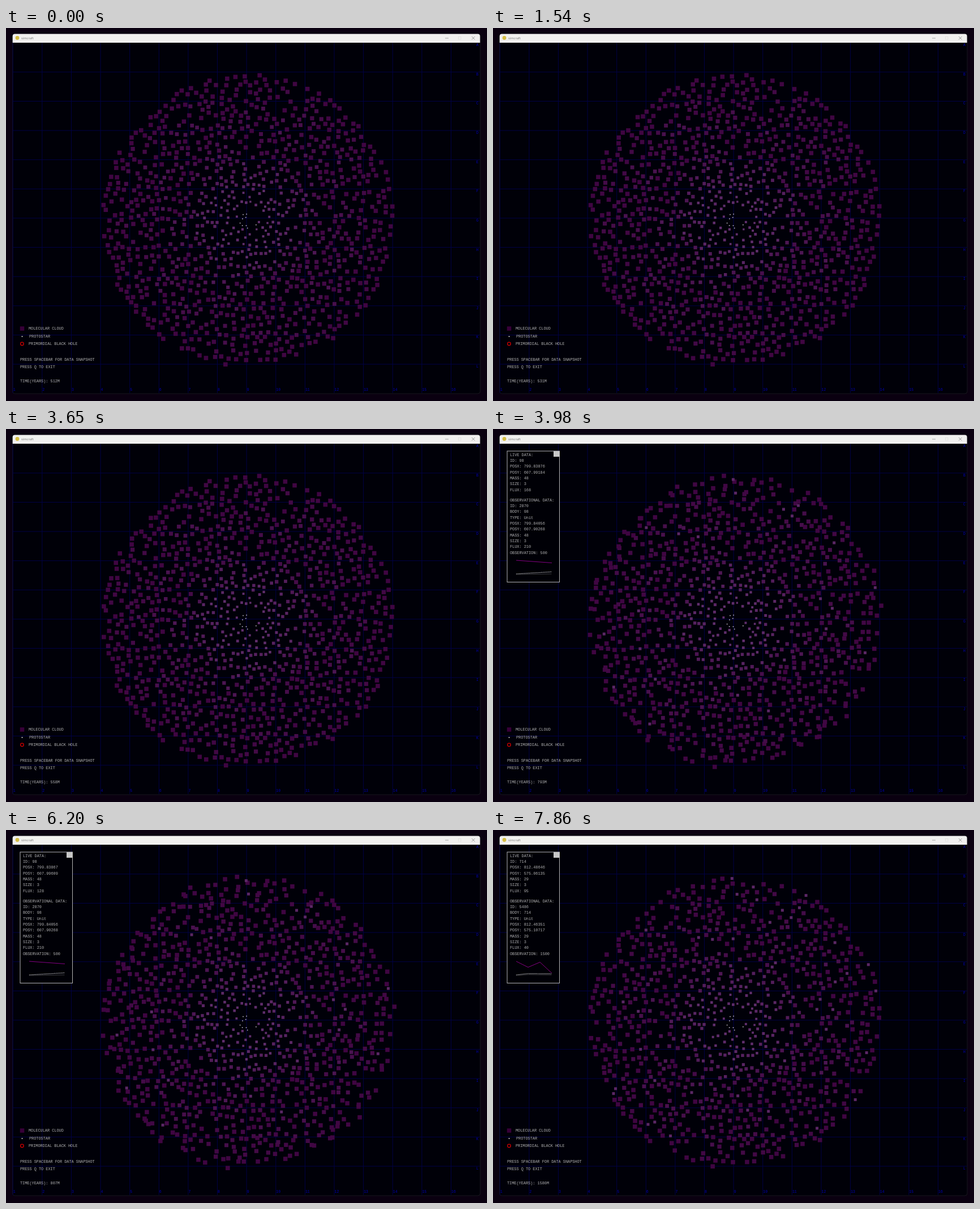
An HTML page with a canvas for the animation above (7.99 s loop, 850 by 659 pixels).

```html
<!DOCTYPE html>
<html lang="en">
<head>
<meta charset="utf-8">
<title>simcraft</title>
<style>
html, body { margin: 0; width: 100%; height: 100%; overflow: hidden; background: #0a0010; }
canvas { display: block; }
</style>
</head>
<body>
<canvas id="stage" width="850" height="659"></canvas>
<script>
const ctx = document.getElementById('stage').getContext('2d');
const LOOP = 7990, CX = 428, CY = 339.5, RADIUS = 258, CELL = 51.62, ROW = 10.33;
const MONO = '"Liberation Mono", "Courier New", monospace';

// Each era starts at a cut; the clock (million years) then runs at a steady rate per ms.
const ERAS = [
  { start: 0, year: 511.99, rate: 0.01286 },
  {
    start: 3850, year: 792.2, rate: 0.00632,
    panel: {
      id: 98, obsId: 2870, mass: 48, obsFlux: 210, obs: 500, refYear: 799, flux: 39,
      pos: [799.83872, 607.99366], drift: [-0.0000062, 0.000304], seen: [799.84056, 607.90268],
      curve: [232, 236.5], upper: [256, 252.3], lower: [257, 256]
    }
  },
  {
    start: 6670, year: 1571.6, rate: 0.0071,
    panel: {
      id: 714, obsId: 5486, mass: 29, obsFlux: 40, obs: 1500, refYear: 1572, flux: 6,
      pos: [812.48413, 575.06599], drift: [0.00029125, -0.00058], seen: [812.46351, 575.10717],
      curve: [232, 242.5, 233.5, 253], upper: [256, 253.5, 253.8, 254], lower: [257, 255.5, 255.8, 256]
    }
  }
];

let seed = 20;
function random() {
  seed = seed + 0x6D2B79F5 | 0;
  let h = Math.imul(seed ^ seed >>> 15, 1 | seed);
  h = h + Math.imul(h ^ h >>> 7, 61 | h) ^ h;
  return ((h ^ h >>> 14) >>> 0) / 4294967296;
}

// Random point in a disc; a larger power gathers points at the centre.
function discPoint(radius, power) {
  const r = radius * random() ** power, a = random() * 2 * Math.PI;
  return { x: CX + r * Math.cos(a), y: CY + r * Math.sin(a), u: r / RADIUS };
}

function makeClouds() {
  const list = [];
  for (let tries = 0; list.length < 1040 && tries < 12000; tries++) {
    const c = discPoint(RADIUS, 0.53);
    const gap = 6.8 + 2.6 * Math.min(1, c.u * 1.8);
    if (c.u < 0.07 || list.some(o => Math.hypot(o.x - c.x, o.y - c.y) < gap)) continue;
    const full = Math.min(7.6, 3.7 + 8 * c.u);
    c.size = full - 1.5 * random() ** 2 * (1 - c.u ** 4);
    c.amp = 0.4 + 2.8 * c.u ** 5;
    c.phase = random() * 2 * Math.PI;
    c.life = random();
    c.shrink = random();
    list.push(c);
  }
  return list;
}
const clouds = makeClouds();
const stars = Array.from({ length: 9 }, () => discPoint(17, 0.6));

function rect(x, y, w, h, color) {
  ctx.fillStyle = color;
  ctx.fillRect(x, y, w, h);
}

function square(x, y, size, color) {
  rect(x - size / 2, y - size / 2, size, size, color);
}

function text(str, x, middle, color = '#b0b0b0', font = '6.87px ' + MONO) {
  ctx.font = font;
  ctx.fillStyle = color;
  ctx.fillText(str, x, middle + 2.2);
}

function line(points, color, width = 1, dash = []) {
  ctx.strokeStyle = color;
  ctx.lineWidth = width;
  ctx.setLineDash(dash);
  ctx.beginPath();
  points.forEach(p => ctx.lineTo(...p));
  ctx.stroke();
  ctx.setLineDash([]);
}

function drawWindow() {
  rect(0, 0, 850, 659, '#0a0010');
  ctx.fillStyle = '#000008';
  ctx.strokeStyle = '#17171d';
  ctx.lineWidth = 1;
  ctx.beginPath();
  ctx.roundRect(11.5, 10.5, 826.5, 635.5, 4);
  ctx.fill();
  ctx.stroke();
  ctx.fillStyle = '#f1f0ef';
  ctx.beginPath();
  ctx.roundRect(11.7, 10.4, 826, 15.5, [4, 4, 0, 0]);
  ctx.fill();
  ctx.fillStyle = '#d5bd45';
  ctx.beginPath();
  ctx.arc(20, 17.5, 3.4, 0, 7);
  ctx.fill();
  text('simcraft', 27, 17.8, '#777', '5.8px "Open Sans", sans-serif');
  line([[776, 18], [782, 18]], '#888', 0.7);
  ctx.strokeStyle = '#dededc';
  ctx.strokeRect(799.5, 15.5, 4.5, 4.5);
  line([[823, 15], [828.5, 20.5]], '#777', 0.7);
  line([[828.5, 15], [823, 20.5]], '#777', 0.7);
}

function drawGrid() {
  const font = '6.5px ' + MONO, lineColor = '#000046', labelColor = '#0000b4';
  for (let i = 0; i < 16; i++) {
    const x = 12 + i * CELL;
    rect(x - 0.3, 26, 1, 619, lineColor);
    text(i + 1, x + 0.7, 638.7, labelColor, font);
  }
  for (let j = 0; j < 12; j++) {
    const y = 26 + j * CELL;
    if (j) rect(12, y - 0.3, 826, 1, lineColor);
    text('ABCDEFGHIJKL'[j], 831, y + 4, labelColor, font);
  }
}

function drawClouds(year, era) {
  const age = year - 511;
  for (const c of clouds) {
    const edge = c.u > 0.87 ? 2 : 1;
    if (c.life < 0.04 * era * edge) continue;
    const size = c.shrink < 0.02 * era * edge ? Math.min(c.size, 5) : c.size;
    const swing = c.phase + age * 0.006;
    const x = c.x + c.amp * (Math.cos(swing) - Math.cos(c.phase));
    const y = c.y + c.amp * (Math.sin(swing) - Math.sin(c.phase));
    const glow = Math.min(1, (7.7 - size) / 3.2);
    square(x, y, size, `rgb(${62 + 34 * glow}, ${4 + 42 * glow}, ${64 + 44 * glow})`);
  }
  for (const s of stars) square(s.x, s.y, 1.6, '#c4bccb');
}

function drawLegend(year) {
  square(28.5, 531, 7.5, '#380039');
  square(28.5, 545, 1.6, '#fff');
  ctx.strokeStyle = '#d00000';
  ctx.lineWidth = 1.3;
  ctx.beginPath();
  ctx.arc(28.4, 558, 2.8, 0, 7);
  ctx.stroke();
  text('MOLECULAR CLOUD', 40, 531);
  text('PROTOSTAR', 41, 545);
  text('PRIMORDIAL BLACK HOLE', 40, 558);
  text('PRESS SPACEBAR FOR DATA SNAPSHOT', 25, 585.5);
  text('PRESS Q TO EXIT', 25, 598.5);
  text(`TIME(YEARS): ${year}M`, 25, 624);
}

// Spreads the given heights evenly over the width of the chart.
function chart(heights, ...style) {
  line(heights.map((y, i) => [41 + 63 * i / (heights.length - 1), y]), ...style);
}

function drawPanel(p, year) {
  rect(25, 39, 92.5, 232, '#000006');
  ctx.strokeStyle = '#b4b4b4';
  ctx.lineWidth = 1;
  ctx.strokeRect(25, 39, 92.5, 231.5);
  rect(107, 39, 10.5, 10, '#c8c8c8');
  const dy = year - p.refYear;
  const now = p.pos.map((v, i) => v + p.drift[i] * dy);
  const flux = 30 + (dy * 79 + p.flux + 1910) % 191;
  const state = (pos, f) => ['POSX: ' + pos[0].toFixed(5), 'POSY: ' + pos[1].toFixed(5),
    'MASS: ' + p.mass, 'SIZE: 3', 'FLUX: ' + f];
  const live = ['LIVE DATA:', 'ID: ' + p.id, ...state(now, flux)];
  const seen = ['OBSERVATIONAL DATA:', 'ID: ' + p.obsId, 'BODY: ' + p.id, 'TYPE: Unit',
    ...state(p.seen, p.obsFlux), 'OBSERVATION: ' + p.obs];
  live.forEach((s, i) => text(s, 30, 45.5 + i * ROW));
  seen.forEach((s, i) => text(s, 30, 125.5 + i * ROW));
  chart(p.curve, '#850085');
  chart(p.upper, '#e0e0e0', 1.2, [1, 1.1]);
  chart(p.lower, '#909090', 0.9, [1, 1.1]);
}

function frame() {
  const t = performance.now() % LOOP;
  const era = ERAS.findLastIndex(e => e.start <= t);
  const { start, year: first, rate, panel } = ERAS[era];
  const year = Math.floor(first + rate * (t - start));
  drawWindow();
  drawGrid();
  drawClouds(year, era);
  drawLegend(year);
  if (panel) drawPanel(panel, year);
  requestAnimationFrame(frame);
}
requestAnimationFrame(frame);
</script>
</body>
</html>
```
